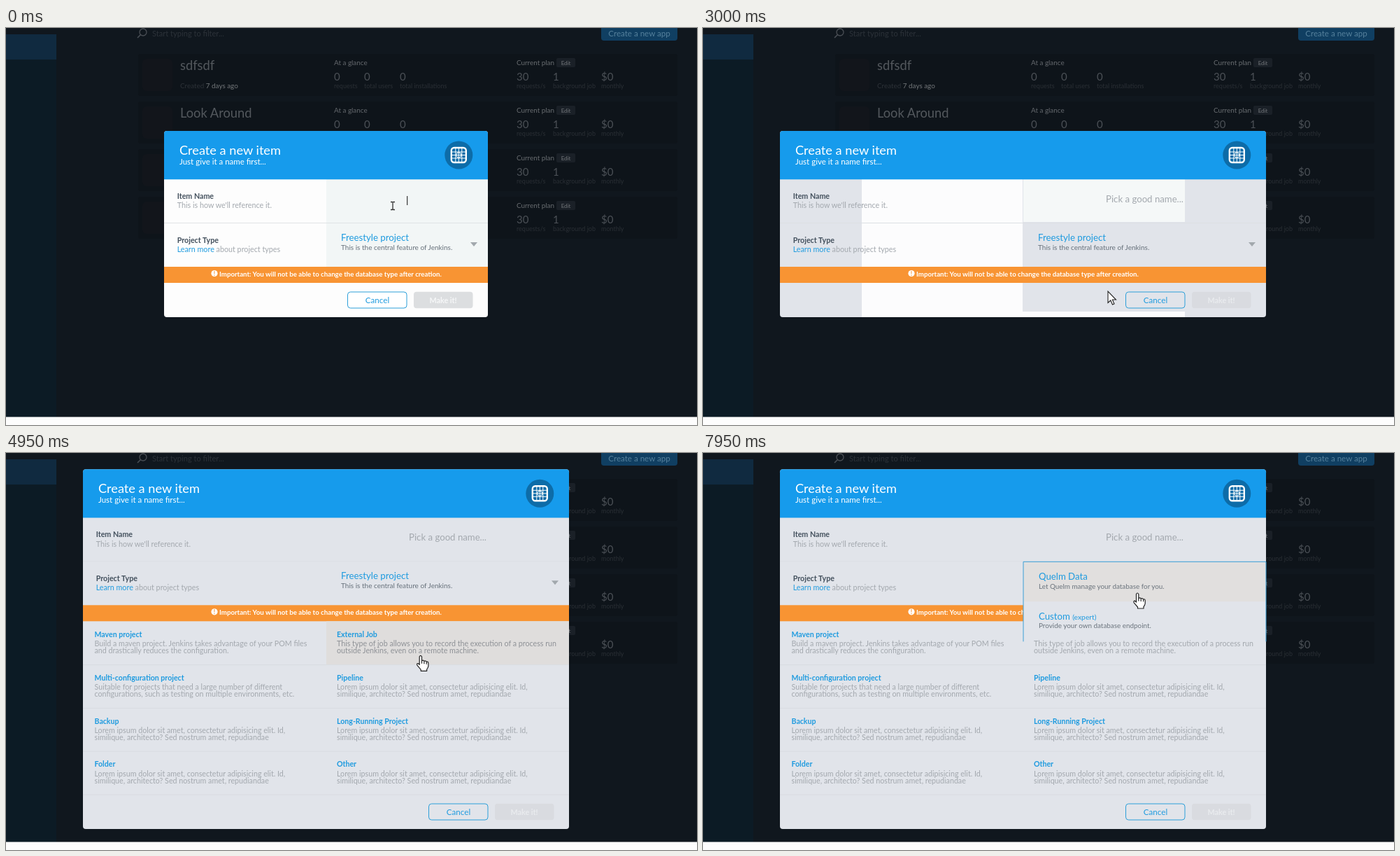
Recreate the animation shown at these times as an HTML page. Size 988x567 px, loop 8000 ms.

```html
<!DOCTYPE html>
<html lang="en">
<head>
<meta charset="utf-8">
<title>Create a new item</title>
<style>
html, body { margin: 0; width: 100%; height: 100%; overflow: hidden; background: #10171e; }
svg { display: block; font-family: Lato, "Open Sans", sans-serif; }
</style>
</head>
<body>
<svg width="988" height="567" viewBox="0 0 988 567">
  <g id="page"></g>
  <g id="modal"></g>
  <g id="pointer"></g>
</svg>
<script>
const LOOP = 8000;
const BLUE = '#1f9bdf', GREY = '#e1e4ea', WARM = '#e1dfde', MUTED = '#a3a8ae', INK = '#43505d';
const $ = id => document.getElementById(id);

const rect = (x, y, w, h, fill, more = '') =>
  `<rect x="${x}" y="${y}" width="${w}" height="${h}" fill="${fill}" ${more}/>`;
const text = (x, y, size, fill, s, more = '') =>
  `<text x="${x}" y="${y}" font-size="${size}" fill="${fill}" ${more}>${s}</text>`;
const path = (d, more) => `<path d="${d}" ${more}/>`;
const bold = 'font-weight="700"', mid = 'text-anchor="middle"';

// Dimmed page behind the dialog
function card(y, name) {
  const stat = (x, n, label) =>
    text(x, y + 38, 15, '#4b5056', n) + text(x, y + 49, 9, '#2a2f35', label);
  return rect(189, y, 771, 60, '#0e141a', 'rx="3"') +
    rect(195, y + 7, 43, 46, '#12151b', 'rx="6"') +
    (name ? text(249, y + 23, 18.3, '#53585d', name) +
      text(249, y + 49, 9.9, '#2d3238', 'Created <tspan fill="#73777a">7 days ago</tspan>') : '') +
    text(469, y + 16, 9.9, '#64686d', 'At a glance') +
    stat(469, 0, 'requests') + stat(512, 0, 'total users') + stat(563, 0, 'total installations') +
    text(730, y + 16, 9.9, '#696d71', 'Current plan') +
    rect(787, y + 6, 27, 13, '#1a2027', 'rx="2"') +
    text(800.5, y + 15.5, 8, '#74787c', 'Edit', mid) +
    stat(730, 30, 'requests/s') + stat(782, 1, 'background job') + stat(851, '$0', 'monthly');
}

$('page').innerHTML =
  rect(0, 0, 988, 567, '#10171e') +
  rect(0, 9, 72, 547, '#0c1b25') + rect(0, 9, 72, 36, '#102a40') +
  '<circle cx="196" cy="6" r="5" fill="none" stroke="#4a4f55" stroke-width="1.3"/>' +
  path('M192.5 9.5L188 14', 'stroke="#4a4f55" stroke-width="1.6"') +
  text(209, 11.5, 11.1, '#2c3239', 'Start typing to filter...') +
  rect(851, -5, 109, 23, '#103f62', 'rx="4"') +
  text(905.5, 12, 11.6, '#55809c', 'Create a new app', mid) +
  ['sdfsdf', 'Look Around', '', ''].map((name, i) => card(37 + 68 * i, name)).join('') +
  rect(0, 555.5, 988, 12, '#fdfdfd');

// Layout of the dialog over time; "left" is the height of the pale pane that stays behind
const STAGES = [
  { at: 0, x: 226, w: 463, top: 147, h: 266 },
  { at: 3000, x: 110, w: 695, top: 147, h: 266, left: 197 },
  { at: 3300, x: 110, w: 695, top: 49, h: 462.5, pitch: 49, left: 27 },
  { at: 3950, x: 110, w: 695, top: 37, h: 486, pitch: 55, left: 14 },
  { at: 4600, x: 110, w: 695, top: 23.3, h: 513.7, pitch: 61.8, lines: true }
];
const FOCUS_END = 900, OPEN = [[900, 2750], [7700, LOOP]];

const LOREM = ['Lorem ipsum dolor sit amet, consectetur adipisicing elit. Id,',
  'similique, architecto? Sed nostrum amet, repudiandae'];
const OPTIONS = [
  ['Maven project', 'Build a maven project. Jenkins takes advantage of your POM files',
    'and drastically reduces the configuration.'],
  ['External Job', 'This type of job allows you to record the execution of a process run',
    'outside Jenkins, even on a remote machine.'],
  ['Multi-configuration project', 'Suitable for projects that need a large number of different',
    'configurations, such as testing on multiple environments, etc.'],
  ['Pipeline', ...LOREM], ['Backup', ...LOREM], ['Long-Running Project', ...LOREM],
  ['Folder', ...LOREM], ['Other', ...LOREM]
];

function icon(cx, cy) {
  const line = 'fill="none" stroke="#fff" stroke-width=';
  return `<g transform="translate(${cx} ${cy})"><circle r="20" fill="#0d6ca8"/>` +
    rect(-10.5, -10.5, 21, 21, 'none', 'rx="4" stroke="#fff" stroke-width="2.4"') +
    path('M-4.5-10V10M0-10V10M4.5-10V10M-10-4.5H10M-10 0H10M-10 4.5H10', line + '"1"') +
    `<circle r="3.6" ${line}"1"/></g>`;
}

function options(s, hover) {
  const y0 = s.top + 217;
  return OPTIONS.map(([name, a, b], i) => {
    const right = i % 2, row = i >> 1, y = y0 + row * s.pitch;
    const x = right ? 473 : 126.5, hot = i === hover, fill = hot ? '#8e9196' : MUTED;
    return (hot ? rect(right ? 458 : s.x, y, 347, s.pitch, '#dfdddc') : '') +
      (s.lines && !right ? rect(s.x, y + s.pitch, s.w, 1, '#d9dce1') : '') +
      text(x, y + 22.7, 10.6, BLUE, name, bold) +
      text(x, y + 35.8, 10.7, fill, a) + text(x, y + 46, 10.7, fill, b);
  }).join('');
}

function dropdown(s, hot) {
  const T = s.top, y = T + 132, w = s.x + s.w - 458;
  const split = s.lines ? 57 : 68.5, h = s.lines ? 112 : 125.5;
  const intro = s.lines ? ['Let Quelm manage your database for you.', '']
    : ['Let Quelm manage your database for', 'you.'];
  const edge = s.lines ? `M458 ${y + 114}V${y}H${458 + w}V${y + 114}` : `M458 ${y}h${w}v${h}h${-w}z`;
  return rect(458, y, w, split, hot ? GREY : WARM) +
    rect(458, y + split, w, h - split, hot ? WARM : GREY) +
    path(edge, 'fill="none" stroke="#3a9fd6"') +
    text(480, y + 26, 13.2, BLUE, 'Quelm Data') +
    text(480, y + 38.5, 9.9, '#6b747d', intro[0]) + text(480, y + 49, 9.9, '#6b747d', intro[1]) +
    text(480, y + split + 25.5, 13.2, BLUE, 'Custom <tspan font-size="10.3">(expert)</tspan>') +
    text(480, y + split + 38, 9.9, '#6b747d', 'Provide your own database endpoint.');
}

function modal(s, { open, focused, caret, hover, hot }) {
  const { x, w, top: T, h } = s, R = x + w, B = T + h, first = s === STAGES[0];
  const mx = (458 + R) / 2;
  let out = rect(x, T, w, h, first ? '#fdfdfd' : GREY, 'rx="4"');
  if (first) out += rect(458, T + 69, R - 458, 125, '#f2f6f6');
  if (s.left) {
    out += rect(227, 216, 230, s.left, '#fcfcfd') + rect(458, 216, 231, 61, '#f5f8f8');
    if (!s.pitch) out += rect(457, 405, 232, 8, '#fcfcfd');
  }
  out += path(`M${x} ${T + 69.3}V${T + 4}q0-4 4-4H${R - 4}q4 0 4 4V${T + 69.3}z`, 'fill="#169bec"') +
    text(x + 22, T + 34, 18.2, '#fff', 'Create a new item') +
    text(x + 22, T + 48, 11.5, '#fff', 'Just give it a name first...') +
    icon(R - 41.7, T + 34.5);
  if (!s.pitch || s.lines) out += rect(x, T + 131, w, 1, first ? '#e0e4e6' : '#dcdfe4');
  out += text(x + 18.7, T + 97, 10.7, INK, 'Item Name', bold) +
    text(x + 18.7, T + 110.3, 10.75, MUTED, 'This is how we\'ll reference it.') +
    text(x + 18.7, T + 159.5, 10.7, INK, 'Project Type', bold) +
    text(x + 18.7, T + 172.8, 10.75, MUTED, `<tspan fill="${BLUE}">Learn more</tspan> about project types`);
  if (!focused) out += text(mx, T + 102, 13.2, MUTED, 'Pick a good name...', mid);
  if (caret) out += rect(573, T + 93, 1.3, 13, '#444');
  out += text(479, T + 157, 13.25, BLUE, 'Freestyle project') +
    text(479, T + 169.5, 10, '#66707a', 'This is the central feature of Jenkins.') +
    path(`M${R - 25} ${T + 159}h10l-5 6z`, 'fill="#a2a8ad"') +
    rect(x, T + 194, w, 23, '#f89433') +
    `<circle cx="298" cy="${T + 203.5}" r="4.6" fill="#fff"/>` +
    text(298, T + 206.5, 8.5, '#f89433', '!', bold + mid.padStart(30)) +
    text(305, T + 208, 9.7, '#fff',
      'Important: You will not be able to change the database type after creation.', bold);
  if (s.pitch) out += options(s, hover);
  out += rect(R - 200.5, B - 36, 84.5, 23, first ? '#fff' : 'none', 'rx="4" stroke="#2c9fd9"') +
    text(R - 158, B - 20.5, 11.6, BLUE, 'Cancel', mid) +
    rect(R - 106, B - 36.3, 84.5, 23.5, first ? '#dcdee0' : '#d9dbe0', 'rx="4"') +
    text(R - 64, B - 20.5, 10.8, first ? '#f6f7f8' : '#e9ebee', 'Make it!', bold + ' ' + mid);
  return open ? out + dropdown(s, hot) : out;
}

// Pointer: time, x, y, shape
const TRACK = [
  [0, 553, 254, 'beam'], [400, 553, 254, 'beam'], [650, 585, 290, 'hand'], [800, 600, 310, 'hand'],
  [1050, 600, 310, 'hand'], [1350, 576, 373, 'hand'], [2750, 579, 376, 'arrow'],
  [3300, 579, 376, ''], [4000, 80, 95, 'arrow'], [4100, 150, 150, 'beam'], [4250, 262, 222, 'beam'],
  [4450, 423, 274, 'beam'], [4600, 423, 274, 'hand'], [5000, 600, 290, 'hand'],
  [5400, 808, 314, 'hand'], [5750, 454, 348, 'hand'], [5950, 454, 348, 'hand'],
  [6250, 320, 400, 'hand'], [6600, 640, 450, 'hand'], [6900, 806, 432, 'hand'],
  [7200, 680, 300, 'hand'], [7500, 632, 188, 'hand'], [7700, 632, 188, 'hand'],
  [7850, 621, 200, 'hand'], [LOOP, 621, 200, 'hand']
];
const SHAPES = {
  '': '',
  beam: path('M-3-5.5h2.2L0-5l.8-.5H3M0-5V5M-3 5.5h2.2L0 5l.8.5H3',
    'fill="none" stroke="#333" stroke-width="1.3"'),
  arrow: path('M0 0V16.5L3.8 13 6.5 19 9 18 6.4 12H11.5Z', 'fill="#fff" stroke="#222" stroke-width="1.1"'),
  hand: path('M-1.5 1.5Q0-1.5 1.8 1.5V7.5Q4 6 5.2 8 7.4 6.8 8.6 9 11 8 11.2 11V15Q10.6 18 9 19.5V22H.5V20' +
    'L-4.8 13.8Q-5.8 11-3.4 11.2L-1.5 13ZM5.2 8V12M8.6 9V12.3M1.8 7.5V11.5',
    'fill="#fff" stroke="#222" stroke-width="1.2" stroke-linejoin="round"')
};

function pointerAt(t) {
  const i = TRACK.findLastIndex(k => k[0] <= t), a = TRACK[i], b = TRACK[i + 1] || a;
  const u = b === a ? 0 : (t - a[0]) / (b[0] - a[0]), e = u * u * (3 - 2 * u);
  return { x: a[1] + (b[1] - a[1]) * e, y: a[2] + (b[2] - a[2]) * e, shape: a[3] };
}

function hoverAt(t, s) {
  if (!s.lines || t < s.at + 120) return -1;
  const { x, y } = pointerAt(t - 120), row = Math.floor((y - s.top - 217) / s.pitch);
  return row < 0 || row > 3 || x < s.x || x > s.x + s.w ? -1 : row * 2 + (x >= 458);
}

let shown = '';
function render(t) {
  const s = STAGES.findLast(k => k.at <= t), p = pointerAt(t);
  const open = OPEN.some(([a, b]) => t >= a && t < b), focused = t < FOCUS_END;
  const state = {
    open, focused,
    caret: focused && t % 1000 < 500,
    hover: open ? -1 : hoverAt(t, s),
    hot: open && p.y > s.top + 200
  };
  const key = s.at + JSON.stringify(state);
  if (key !== shown) {
    $('modal').innerHTML = modal(s, state);
    shown = key;
  }
  $('pointer').innerHTML = SHAPES[p.shape];
  $('pointer').setAttribute('transform', `translate(${p.x} ${p.y})`);
}

const start = performance.now();
function tick() {
  render((performance.now() - start) % LOOP);
  requestAnimationFrame(tick);
}
tick();
</script>
</body>
</html>
```
